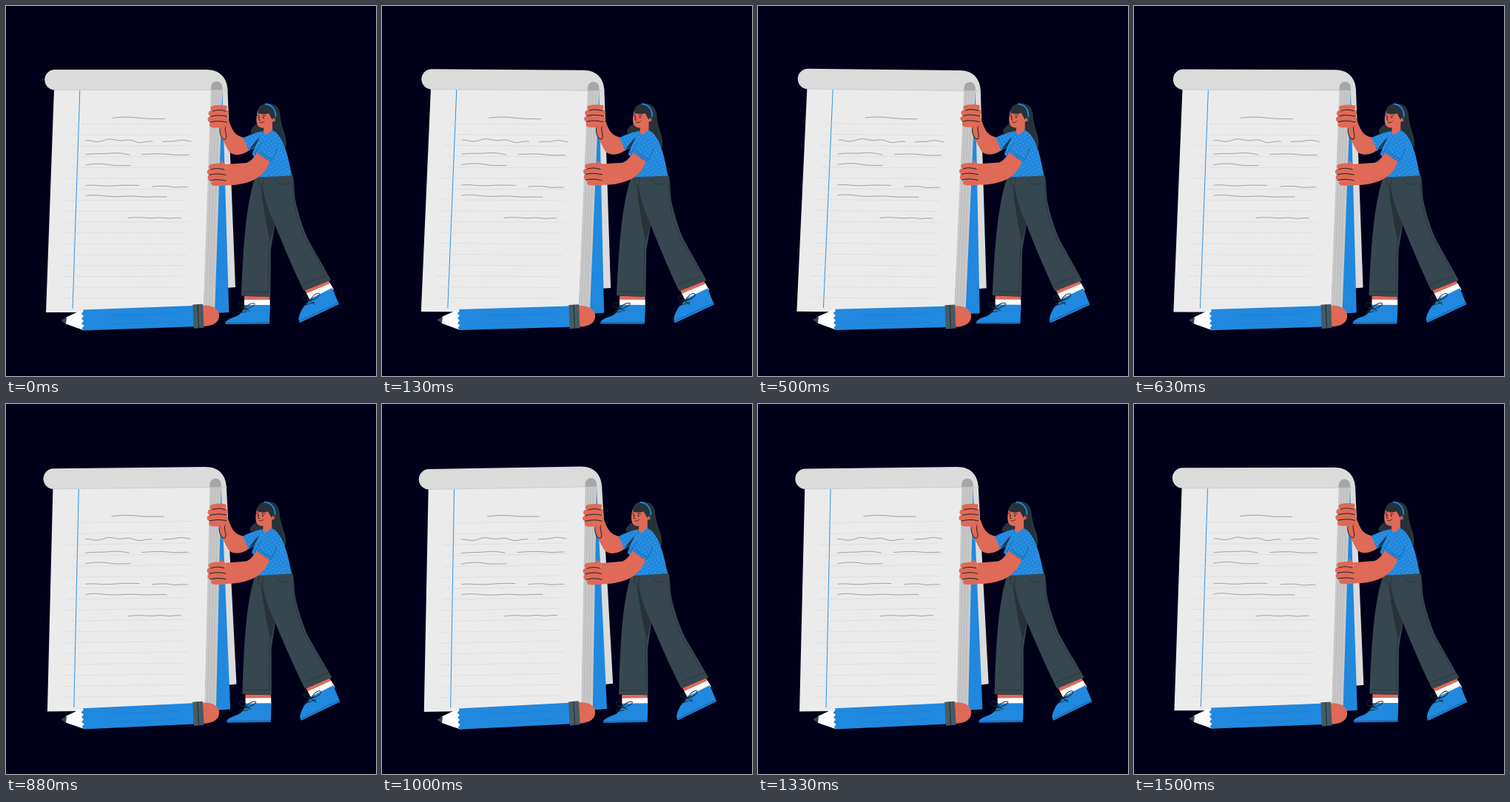
Animation, 500 px wide and 500 px high, one loop 1540 ms. Source, as an HTML page:

```html
<!DOCTYPE html>
<html lang="en">
<head>
<meta charset="utf-8">
<title>Writing</title>
<style>
html, body { margin: 0; width: 100%; height: 100%; overflow: hidden; background: #00001a; }
svg { display: block; width: 100vw; height: 100vh; }
.blue { fill: #2088de; }
.skin { fill: #de6a57; }
.slate { fill: #37474f; }
.dark { fill: #263238; }
.grey { fill: #dbdbdb; }
.ink, .thin, .note, .rule { fill: none; stroke-linecap: round; stroke-linejoin: round; }
.ink { stroke: #1c2529; stroke-width: 1; }
.thin { stroke: #222e34; stroke-width: .6; }
.note { stroke: #7c7c7c; stroke-width: .65; }
.rule { stroke: #d6d6d6; stroke-width: .6; }
</style>
</head>
<body>
<svg viewBox="0 0 500 500">
  <defs>
    <pattern id="dots" width="6.4" height="6.4" patternUnits="userSpaceOnUse" patternTransform="rotate(12)">
      <rect width="6.4" height="6.4" fill="#2088de"/>
      <circle cx="1.6" cy="1.6" r=".55" fill="#a5cff2"/>
      <circle cx="4.8" cy="4.8" r=".55" fill="#a5cff2"/>
    </pattern>
  </defs>

  <g id="pad">
    <path class="grey" d="M285 112H299.400L310 380L298 381Z"/>
    <path class="blue" d="M280 112H292.300L301.300 414L268 416Z"/>
    <path fill="#ebebeb" d="M65 112H278L267 414L54 414Z"/>
    <path class="grey" d="M66 86H271C289 86 299 97 299.500 114L66 113.500A13.750 13.750 0 0 1 66 86Z"/>
    <path fill="#c8c8c8" d="M277 110H292.500L282 415H266.500Z"/>
    <path fill="#a6a6a6" d="M277 113.500V109.500A7.700 7.700 0 0 1 292.400 109.500V113.500Z"/>
    <path d="M280.500 114L270.500 405M284 114L274.500 405M288 114L278 405" fill="none" stroke="#b3b3b3" stroke-width=".6"/>
    <path d="M66 113.500H299" fill="none" stroke="#b4b9be" stroke-width=".5"/>
    <path d="M99.800 114L90 409" fill="none" stroke="#2088de" stroke-width=".9"/>
    <g id="rules"></g>
    <path class="note" d="M144 151.500C156 149.500 170 150 182 151.500S203 152 214 152.500
      M108 182C114 180 118 185 127 183S136 179.500 142 180S152 183 160 181.500S171 182 177 184S190 182 198 183
      M212 183.500C219 182 224 184 231 182S243 182 250 183
      M108 200.500C118 199 132 200 143 199S158 199.500 167 201
      M184 200.500C196 200 208 199 220 200.500S236 201 247 201
      M108 215C118 213 128 212.500 139 214.500S157 215.500 168 215.500
      M108 242.500C120 241 126 244 143 243S164 242 180 242.500
      M198 244C209 243 217 243 224 244.500S237 244 245 244.500
      M108 256.500C121 254 129 257 144 257.500S165 256 179 257.500S204 257 217 258
      M165 286.500C178 285 185 286 193 286.500S206 285 215 286.500S227 285.500 236 286.500"/>
  </g>

  <g id="pencil">
    <path fill="#fff" d="M80.500 421L103 410.500H108V438H104.500L80.500 429.500Z"/>
    <path class="slate" d="M74 425L82 420.700L81 429.500Z"/>
    <path class="blue" d="M104 410.400L253 405L254.500 433.300L105 438.600L102.500 435.500L105.500 432L102 429L105 425.500L102 422.500L105 419L101.500 416L104.500 413Z"/>
    <path d="M138 418Q185 418 232 415.500M142 430Q188 429.500 234 426.500" fill="none" stroke="#1b79c8" stroke-width=".5"/>
    <path class="skin" d="M265 404.500C279 403.500 288 409 288.200 418C288 428 280 432.500 266 433Z"/>
    <path fill="#455a64" d="M252.300 403.500L266 402.700L267.500 434.700L253.700 435.700Z"/>
    <path d="M259 403.200L260.500 435" fill="none" stroke="#263238" stroke-width="1.200"/>
  </g>

  <g id="girl">
    <!-- hair behind -->
    <path class="dark" d="M354 132C367 131 371 141 371 151C372 166 380 174 378.700 190C374 196 366 181 359 173L334 172C328 172 331 166 337 161L352 148Z"/>
    <path d="M371 155C372 169 378 176 377 188M337 161C331 167 329 171 333 174" fill="none" stroke="#37474f" stroke-width=".6"/>

    <!-- far arm -->
    <path class="skin" d="M290 158L299 149C302 157 304 164 308 170C312 175 317 177 322 178L330 194C319 203 306 203 301 196C296 187 293 181 290 173Z"/>
    <path fill="url(#dots)" d="M320 178.500C329 174 337 171 347 169L349 182L338 191L327.500 196C326 189 324 184 320 178.500Z"/>
    <path fill="#1b3b55" d="M343 177C338 182 331 189 328.500 196L337 190Z"/>

    <!-- far leg -->
    <path class="slate" d="M337 231C326 262 321 310 318 391.500L357.300 393L357.800 330L364 292L355 232Z"/>
    <path class="dark" d="M344 239C347 268 351 294 357 319L363 294L350 250Z"/>
    <path class="thin" d="M320.500 386L354.500 386.700C354 360 355 340 355.500 318"/>
    <path class="skin" d="M322 392L356.500 393V398H322Z"/>
    <path fill="#fff" d="M322 397H356.700V405H322Z"/>
    <path class="blue" d="M322 404H357L356 429.500L297 430C294 426 303 422 311 419.500C318 416 322 410 322 404Z"/>
    <path d="M297 428.500L356 427.800" fill="none" stroke="#0f4d84" stroke-width=".7"/>
    <path class="ink" d="M320 409C313 407 312 401 317 401S323 407 322 410C327 409 337 405 336 402.500S325 403 322 410M315 412.500L326 409M313 415L325 413M318 407L329 412"/>

    <!-- near leg -->
    <path class="slate" d="M340 231L387.500 229C390 238 389 250 391 262C395 282 401 298 406 311C412 323 426 346 439.300 370.500L402.500 385C387 353 371 315 362 292C351 269 347 251 345 232Z"/>
    <path class="thin" d="M399.500 377L435.500 363M388 236C387 262 391 282 402 310C410 326 421 341 429 358M365 234C369 242 377 243 383 239M347 232Q347 240 349 247M342 232L341 244"/>
    <path class="skin" d="M404 384.500L436 371.500L439 376L407 390Z"/>
    <path fill="#fff" d="M406.300 388.500L438 374.700L443 383L411 398Z"/>
    <path class="blue" d="M411 395.500L441 381C444 389 447 396 450 403L397 428C393.500 423 397 416 400 410C403 404 409 402 411 395.500Z"/>
    <path d="M396 426L449.500 401" fill="none" stroke="#0f4d84" stroke-width=".7"/>
    <path class="ink" d="M411 398C405 399 400 396 401 393S408 393 411 398C413 393 419 387 423 388.500S419 397 411 398M403 402L415 396M402 405L417 400M407 396L417 403"/>

    <!-- neck and torso -->
    <path class="skin" d="M349 159L347.500 173L352 177L360 170L360 155Z"/>
    <path fill="url(#dots)" d="M347 171Q353 177 358.500 167.500C365 169 369 175 373 182C380 196 383 213 386.300 229.300L340 231.500C341 218 338 207 332.500 200C336 191 341 181 347 171Z"/>

    <!-- near arm -->
    <path class="skin" d="M341 197C335 204 331 210 325 212L297 214L295 242C310 243 324 240 335 235C346 229 355 219 357 207Z"/>
    <path fill="url(#dots)" d="M340 197.500C345 192 350 184 357 178L370 188C368 197 364 205 359 210C352 208 346 203 340 197.500Z"/>
    <path d="M340 197.500C346 203 352 208 359 210M342.500 195.500C348 201 354 205 360 207M359 208C364 202 365 197 366 192M346 184C342 190 338 196 336 201" fill="none" stroke="#12599b" stroke-width=".7"/>

    <!-- head -->
    <path class="skin" d="M340 142C338.500 148 337.500 156 339.500 160C341 164 346 165.500 350 164.300C355 163 359 160 360.500 156C365 157 367 151 363 149L361 138H342Z"/>
    <path class="dark" d="M340.500 145C339 136 347 131 355 132C365 133 370 142 369 154L364 158C365 154 364 151 361 151L360 154C358 151 357 148 355 145C350 147 345 146 340.500 145Z"/>
    <path d="M350 132.500C359 132.500 365 140 364.500 150" fill="none" stroke="#2088de" stroke-width="1.800"/>
    <path class="ink" style="stroke-width:.8" d="M339.500 147.500L342 147M346.500 148Q348.500 146.500 351 148.500M342.500 150L341.500 154L343.500 154.300M343 157.500Q346 159 349 156"/>
    <ellipse class="dark" cx="341.600" cy="150" rx=".9" ry="1.200"/>
    <ellipse class="dark" cx="348" cy="150.700" rx="1" ry="1.200"/>
    <path class="thin" d="M362 152Q364 152 362.500 155"/>

    <!-- hands -->
    <path class="skin" d="M299 149L300 158C297 167 299 176 297 179C294 183 289 176 289 170L290 158Z"/>
    <path class="ink" d="M297 162C294 169 300 175 297 179.500C293 183 288 174 289 165"/>
    <path class="skin" d="M290 208L298 215L291 218Z"/>
    <g id="fingers"></g>
  </g>
</svg>
<script>
const el = id => document.getElementById(id);

// Ruled lines drift left as they go down the sheet
let ruled = '';
for (let i = 0; i < 17; i++) {
  const y = 159.5 + i * 14.72, jog = i % 3 * 3;
  ruled += `M${92 - i * .9 - jog} ${y}L${253 - i * .7 - jog} ${y - .2}`;
}
el('rules').innerHTML = `<path class="rule" d="${ruled}"/>`;

// Each finger: left tip, right end, top, height
const finger = ([l, r, y, h]) => `<path class="skin" d="M${r} ${y + .5}
  Q${(l + r) / 2} ${y - 1} ${l + 5} ${y + .5}Q${l} ${y + 1} ${l} ${y + h * .55}
  Q${l} ${y + h} ${l + 6} ${y + h}H${r - 1}Q${r + 2} ${y + h / 2} ${r} ${y + .5}Z"/>`;
const crease = ([l, r, y, h]) =>
  `<path class="ink" d="M${l + 3} ${y + h}Q${(l + r) / 2} ${y + h - 3} ${r - 1} ${y + h}"/>`;
const hands = [
  [[276.5, 298, 134, 8], [273.5, 300, 140.500, 8.800], [272.5, 299.5, 148.500, 8.600], [275, 297, 156, 8.500]],
  [[274, 296, 213, 8], [271.8, 298, 219.500, 8.800], [272.5, 298, 227.500, 8.600], [277, 298, 235, 8]]
];
el('fingers').innerHTML = hands.map(h =>
  h.map(finger).join('') + h.slice(0, 3).map(crease).join('')).join('');

// Every part rocks around its own middle; it is drawn in its pose at step 0
const LOOP = 1540, STEPS = 37;
const parts = [
  ['pad', .9, 181, 250],
  ['pencil', .85, 181, 421],
  ['girl', .8, 371, 245]
];
const sway = step => Math.sin((step + 1) / STEPS * 2 * Math.PI);

function draw(now) {
  const step = Math.floor(((now % LOOP) + 4) / LOOP * STEPS) % STEPS;
  const turn = sway(step) - sway(0);
  for (const [id, amp, x, y] of parts)
    el(id).setAttribute('transform', `rotate(${(amp * turn).toFixed(4)} ${x} ${y})`);
}

let start;
function tick(now) {
  start ??= now;
  draw(now - start);
  requestAnimationFrame(tick);
}
draw(0);
requestAnimationFrame(tick);
</script>
</body>
</html>
```
